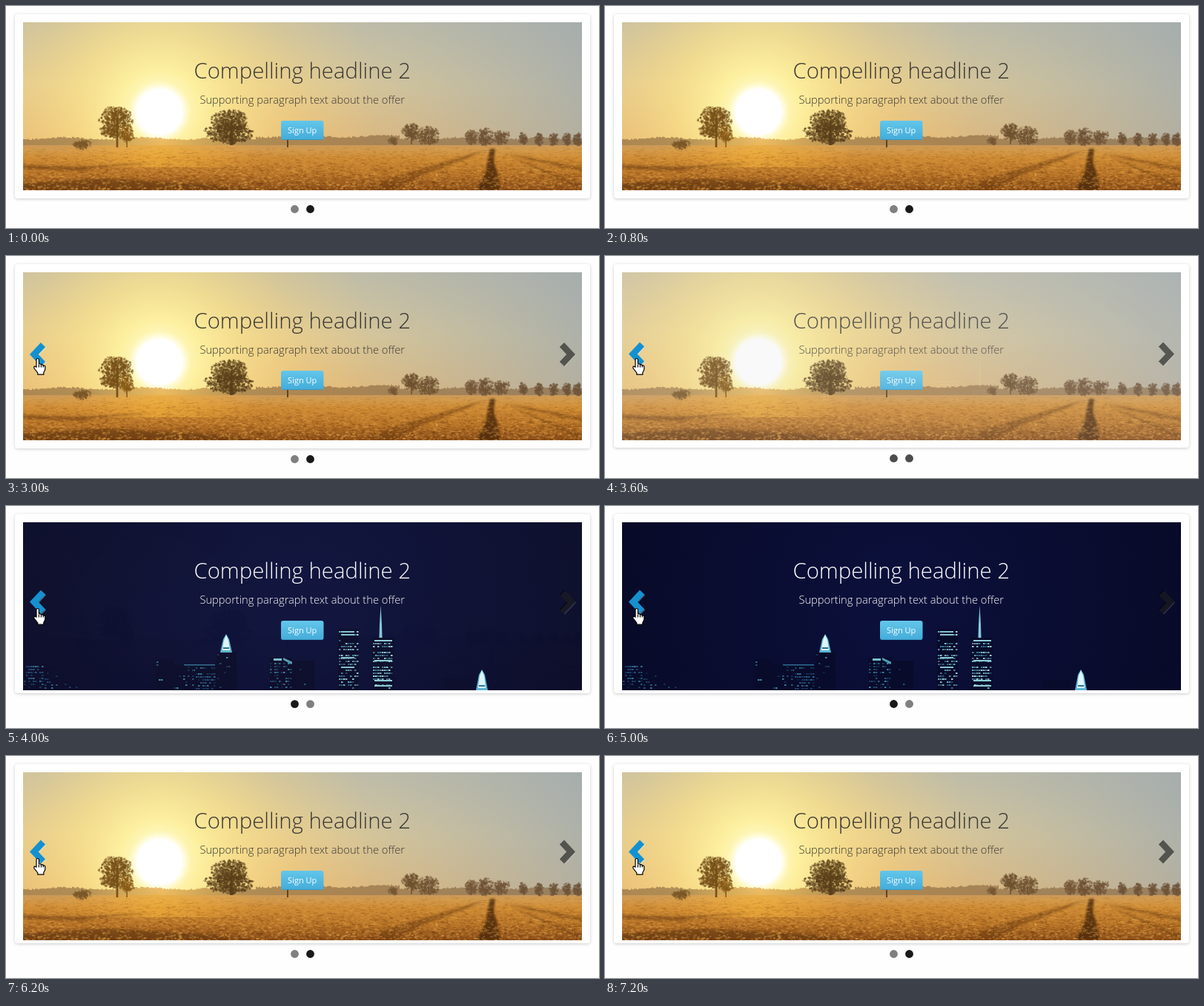
Recreate the animation shown at these times as an HTML page with a canvas. Size 800 px wide and 300 px high, loop 7.4 s.

```html
<!DOCTYPE html>
<html lang="en">
<head>
<meta charset="utf-8">
<title>Headline slider</title>
<style>
  html, body { margin: 0; width: 100%; height: 100%; overflow: hidden; background: #fefefe; }
  canvas { display: block; }
</style>
</head>
<body>
<canvas id="stage" width="800" height="300"></canvas>
<script>
const LOOP = 7400, STEP = 200;
const PHOTO = { x: 23, y: 22, w: 754, h: 227 };
const ctx = document.getElementById('stage').getContext('2d');

const clamp = v => Math.max(0, Math.min(1, v));
const ramp = (t, start, length) => clamp((t - start) / length);
const swing = p => 0.5 - Math.cos(p * Math.PI) / 2;
const mix = (a, b, p) => a + (b - a) * p;

function seeded(seed) {
  return () => {
    seed = (seed * 1664525 + 1013904223) % 4294967296;
    return seed / 4294967296;
  };
}

function stops(gradient, list) {
  for (const [at, color] of list) gradient.addColorStop(at, color);
  return gradient;
}

function fillRect(g, style, x, y, w, h) {
  g.fillStyle = style;
  g.fillRect(x, y, w, h);
}

function roundRect(g, x, y, w, h, r) {
  g.beginPath();
  g.roundRect(x, y, w, h, r);
  g.fill();
}

function polygon(g, color, ...points) {
  g.fillStyle = color;
  g.beginPath();
  for (let i = 0; i < points.length; i += 2) g.lineTo(points[i], points[i + 1]);
  g.fill();
}

function text(g, words, y, size, weight, color) {
  g.font = `${weight} ${size}px "Open Sans", sans-serif`;
  g.fillStyle = color;
  g.textAlign = 'center';
  g.fillText(words, 399.7, y);
}

// A slide is painted once in stage coordinates, then cross-faded.
function makeSlide(paint, textColor) {
  const canvas = document.createElement('canvas');
  canvas.width = PHOTO.w;
  canvas.height = PHOTO.h;
  const g = canvas.getContext('2d');
  g.translate(-PHOTO.x, -PHOTO.y);
  paint(g);
  text(g, 'Compelling headline 2', 98, 29.35, 300, textColor);
  text(g, 'Supporting paragraph text about the offer', 132, 14.7, 300, textColor);
  g.fillStyle = stops(g.createLinearGradient(0, 155, 0, 181), [[0, '#63c6ea'], [1, '#43acd9']]);
  roundRect(g, 371, 155, 57.5, 26, 3);
  fillRect(g, '#3797c4', 373, 180, 54, 1);
  text(g, 'Sign Up', 172, 11, 400, '#fff');
  return canvas;
}

function paintSunset(g) {
  const random = seeded(11);
  const { x, y, w, h } = PHOTO;
  const layer = style => fillRect(g, style, x, y, w, h);

  // Foliage: small leaves scattered around a few random lobes
  function tree(cx, cy, rx, ry, color, ground = 0) {
    g.fillStyle = color;
    if (ground) g.fillRect(cx - rx * 0.06, cy, Math.max(1.5, rx * 0.12), ground - cy);
    for (let lobe = 0; lobe < 9; lobe++) {
      const turn = lobe * 0.7, out = lobe ? 0.45 + random() * 0.25 : 0;
      const lx = cx + Math.cos(turn) * rx * out, ly = cy + Math.sin(turn) * ry * out;
      for (let i = 0; i < rx * ry / 5 + 4; i++) {
        const angle = random() * 7, reach = Math.sqrt(random()) * 0.5;
        g.globalAlpha = 0.3 + random() * 0.4;
        g.beginPath();
        g.arc(lx + Math.cos(angle) * rx * reach, ly + Math.sin(angle) * ry * reach,
          0.6 + random() * 1.1, 0, 7);
        g.fill();
      }
    }
    g.globalAlpha = 1;
  }

  layer(stops(g.createLinearGradient(0, 22, 0, 190),
    [[0, '#c6c1a6'], [0.5, '#e0cb95'], [1, '#e6b873']]));
  layer(stops(g.createLinearGradient(400, 170, 790, 10),
    [[0, 'rgba(170,176,174,0)'], [1, 'rgba(160,170,174,.9)']]));
  layer(stops(g.createRadialGradient(207, 140, 20, 207, 140, 290), [
    [0, '#fffbd0'], [0.13, 'rgba(255,243,160,.92)'], [0.32, 'rgba(254,230,140,.68)'],
    [0.62, 'rgba(250,214,125,.27)'], [1, 'rgba(240,204,130,0)']]));
  layer(stops(g.createRadialGradient(207, 143, 0, 207, 143, 43),
    [[0, '#fff'], [0.7, '#fff'], [1, 'rgba(255,252,205,0)']]));

  // Distant tree line in the haze
  for (let px = 23; px < 777; px += 2) {
    const top = 178 + Math.sin(px / 17) * 1.5 + random() * 2 - (px > 335 && px < 530 ? 3 : 0);
    const sunlit = clamp(1 - Math.abs(px - 210) / 110);
    fillRect(g, `rgba(${mix(132, 225, sunlit)},${mix(98, 150, sunlit)},${mix(58, 45, sunlit)},.6)`,
      px, top, 2, 190 - top);
  }

  fillRect(g, stops(g.createLinearGradient(0, 186, 0, 249), [
    [0, '#c9985c'], [0.14, '#d29a4c'], [0.3, '#cf8c35'], [0.65, '#b97528'], [1, '#8c4f1a']]),
    23, 188, 754, 61);
  fillRect(g, stops(g.createRadialGradient(207, 186, 0, 207, 186, 140),
    [[0, 'rgba(255,190,60,.6)'], [1, 'rgba(255,180,60,0)']]), 23, 188, 754, 30);

  // Furrows, softened so that the grain breaks up their edges
  g.filter = 'blur(1.6px)';
  g.globalAlpha = 0.5;
  polygon(g, '#673912', 23, 214, 90, 217, 200, 212, 90, 223, 23, 220);
  polygon(g, '#55300f', 23, 240, 130, 233, 260, 240, 350, 249, 23, 249);
  polygon(g, '#6b3b11', 648, 194, 590, 211, 520, 232, 490, 249, 524, 249, 570, 225, 620, 207);
  polygon(g, '#6b3b11', 670, 198, 777, 218, 777, 223, 705, 208);
  polygon(g, '#6b3b11', 680, 203, 777, 241, 777, 248, 710, 218);
  g.globalAlpha = 0.85;
  polygon(g, '#4b2a0c', 653, 193, 660, 193, 658, 208, 663, 226, 667, 249, 635, 249, 648, 222, 650, 207);
  g.filter = 'none';

  // Grain, coarser towards the viewer
  for (let i = 0; i < 6500; i++) {
    const depth = random(), py = 191 + depth * 58;
    const dark = random() < 0.45 + depth * 0.1;
    g.globalAlpha = 0.12 + depth * 0.2;
    fillRect(g, dark ? '#6b3a0e' : '#f2b455', 23 + random() * 754, py,
      1.5 + random() * (5 - depth * 2), 0.6 + depth * 1.4);
  }
  g.globalAlpha = 1;

  tree(150, 150, 22, 14, '#77501a', 191);
  tree(143, 168, 17, 10, '#77501a');
  tree(163, 172, 10, 12, '#875917', 191);
  tree(103, 187, 13, 6, '#7b5728');
  tree(304, 155, 24, 14, '#5f451d', 188);
  tree(304, 172, 33, 13, '#5b411c', 188);
  tree(547, 171, 12, 12, '#6e512f', 187);
  tree(570, 175, 14, 12, '#715433', 187);
  tree(522, 183, 6, 5, '#785936');
  tree(628, 177, 9, 10, '#77593a', 188);
  tree(647, 177, 11, 11, '#705336', 188);
  tree(668, 178, 11, 10, '#73563a', 188);
  for (const px of [698, 719, 739, 757, 771]) tree(px, 180, 6, 8, '#70553a', 188);
  fillRect(g, '#60441f', 379, 180, 2, 11);
}

function paintNight(g) {
  const random = seeded(5);
  const { x, y, w, h } = PHOTO;
  fillRect(g, '#090d32', x, y, w, h);
  fillRect(g, stops(g.createRadialGradient(400, 130, 40, 400, 130, 430),
    [[0, 'rgba(12,17,62,.75)'], [1, 'rgba(7,8,32,.65)']]), x, y, w, h);

  function building(left, top, width, density, colors) {
    fillRect(g, '#080b2a', left, top, width, 249 - top);
    for (let py = top + 3; py < 247; py += 4) {
      const row = random() < 0.75 ? density * 1.3 : density * 0.3;
      for (let px = left + 1; px < left + width - 2; px += 3) {
        if (random() > row) continue;
        g.globalAlpha = 0.4 + random() * 0.6;
        fillRect(g, colors[Math.floor(random() * colors.length)], px, py, 2.5, 2);
      }
    }
    g.globalAlpha = 1;
  }

  function crown(cx, top, bottom, half) {
    polygon(g, '#5ab5d3', cx, top, cx + half * 0.5, top + 7, cx + half, bottom, cx - half, bottom, cx - half * 0.5, top + 7);
    polygon(g, '#dff8fb', cx, top + 1, cx + half * 0.4, top + 9, cx + half * 0.65, bottom - 3, cx - half * 0.65, bottom - 3, cx - half * 0.4, top + 9);
    fillRect(g, '#2b7295', cx - half * 0.5, bottom - 7, half, 2);
  }

  const dim = ['#245a83', '#3d87a8', '#173f69'];
  const bright = ['#a8dee5', '#6bb6cb', '#3f88a9'];
  building(23, 213, 28, 0.35, dim);
  building(51, 222, 24, 0.25, dim);
  building(75, 233, 24, 0.3, dim);
  building(202, 207, 24, 0.1, dim);
  building(226, 214, 58, 0.18, dim);
  building(255, 215, 30, 0.45, dim);
  fillRect(g, '#2e6d91', 240, 214, 42, 1.5);
  building(284, 197, 27, 0.06, dim);
  building(355, 205, 31, 0.35, dim);
  fillRect(g, '#75bdcf', 361, 206, 11, 3);
  polygon(g, '#529bb4', 374, 205, 387, 211, 385, 214, 374, 208);
  building(386, 209, 30, 0.05, dim);
  building(448, 166, 28, 0.5, bright);
  building(494, 178, 29, 0.57, bright);
  for (const py of [169, 173, 204, 217]) fillRect(g, '#82c4d2', 452, py, 18, 2);
  for (const py of [181, 208, 235, 242]) fillRect(g, '#8fcfd9', 497, py, 24, 2);
  building(590, 234, 38, 0.04, dim);
  crown(297, 173, 198, 8);
  crown(642, 221, 249, 8);
  polygon(g, '#84c9dc', 505.5, 134, 507, 160, 507.5, 178, 503.5, 178, 504, 160);
}

const sunset = makeSlide(paintSunset, '#383632');
const night = makeSlide(paintNight, '#fff');

function drawSlide(slide, alpha) {
  ctx.globalAlpha = alpha;
  ctx.drawImage(slide, PHOTO.x, PHOTO.y);
  ctx.globalAlpha = 1;
}

// The leaving slide lies on top; both are translucent over the white card.
function crossfade(leaving, arriving, p) {
  drawSlide(arriving, p);
  drawSlide(leaving, 1 - p);
}

function dot(x, y, strength) {
  ctx.fillStyle = `rgba(0,0,0,${mix(0.5, 0.9, strength)})`;
  ctx.beginPath();
  ctx.arc(x, y, 5.4, 0, 7);
  ctx.fill();
}

function chevron(x, y, direction, color, alpha) {
  ctx.save();
  ctx.globalAlpha = alpha;
  ctx.translate(x, y);
  ctx.scale(direction, 1);
  ctx.lineWidth = 8.5;
  ctx.strokeStyle = color;
  ctx.shadowColor = 'rgba(255,255,255,.3)';
  ctx.shadowOffsetX = ctx.shadowOffsetY = 1;
  ctx.beginPath();
  ctx.moveTo(-7.5, -13);
  ctx.lineTo(4.7, 0);
  ctx.lineTo(-7.5, 13);
  ctx.stroke();
  ctx.restore();
}

const hand = new Path2D('M4 12V2.2a1.7 1.7 0 0 1 3.4 0V8q2.6-.8 3 .8 2.4-.6 2.8 1 2.6-.2 2.6 1.8v4l-2 4v2.6h-8V20L1 13.8Q.2 11.4 2 11.2z');

function cursor(x, y) {
  ctx.save();
  ctx.translate(x, y);
  ctx.fillStyle = '#fff';
  ctx.strokeStyle = '#000';
  ctx.lineWidth = 1.2;
  ctx.fill(hand);
  ctx.stroke(hand);
  ctx.beginPath();
  for (const px of [7.4, 10.4, 13.2]) {
    ctx.moveTo(px, 9);
    ctx.lineTo(px, 12.5);
  }
  ctx.stroke();
  ctx.restore();
}

function draw(t) {
  const toNight = swing(ramp(t, 3450, 600));
  const toSunset = swing(ramp(t, 5500, 600));
  const firstDot = ramp(t, 3450, 300) - ramp(t, 5450, 300);
  const lift = 7 * toNight;

  ctx.fillStyle = '#fefefe';
  ctx.fillRect(0, 0, 800, 300);

  ctx.save();
  ctx.shadowColor = 'rgba(0,0,0,.2)';
  ctx.shadowBlur = 4;
  ctx.shadowOffsetY = 1;
  ctx.fillStyle = '#fff';
  roundRect(ctx, 12, 11, 776, 249 - lift, 4);
  ctx.restore();

  if (toSunset > 0) crossfade(night, sunset, toSunset);
  else crossfade(sunset, night, toNight);

  dot(389.5, 274.5 - lift, firstDot);
  dot(410.5, 274.5 - lift, 1 - firstDot);

  if (t < 1600) return;
  const slideIn = ramp(t, 1680, 300);
  const hover = ramp(t, 1900, 300);
  const arrowY = 133 - lift / 2;
  const inset = mix(-18, 42.5, slideIn);
  const blue = `rgba(${mix(0, 20, hover)},${mix(0, 145, hover)},${mix(0, 208, hover)},${mix(0.8, 1, hover)})`;
  chevron(inset, arrowY, -1, blue, slideIn * mix(0.7, 1, hover));
  chevron(800 - inset, arrowY, 1, 'rgba(0,0,0,.8)', slideIn * 0.7);

  const arrive = ramp(t, 1600, 200), settle = ramp(t, 1800, 400);
  cursor(mix(4, 36, arrive) + settle, mix(150, 140, arrive) - 2 * settle);
}

function frame() {
  const t = performance.now() % LOOP;
  draw(Math.floor(t / STEP) * STEP);
  requestAnimationFrame(frame);
}
frame();
</script>
</body>
</html>
```
